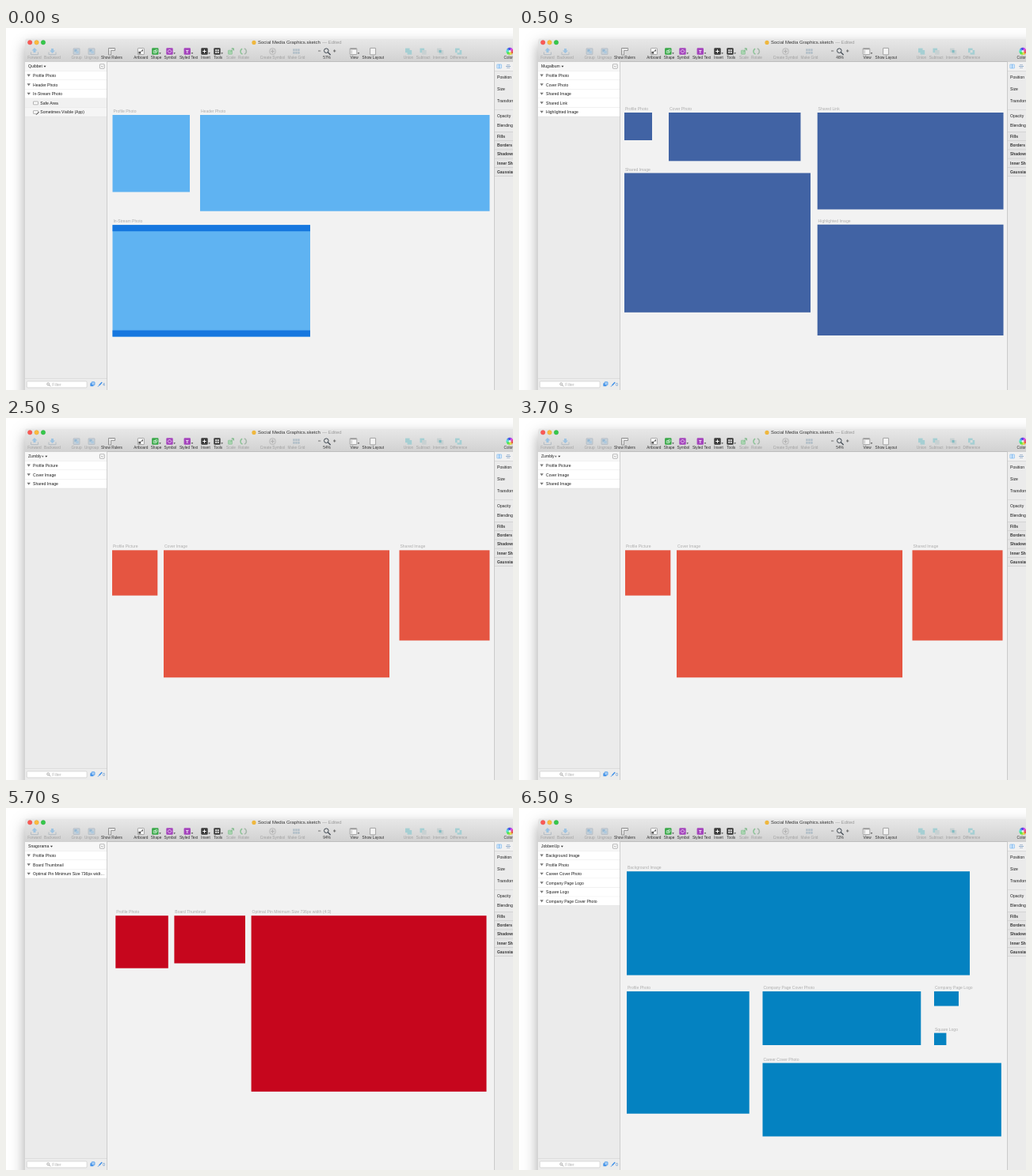
Recreate the animation shown at these times as an HTML page with a canvas. Size 640 by 458 pixels, loop 8 s.

```html
<!DOCTYPE html>
<html lang="en">
<head>
<meta charset="utf-8">
<title>Artboard templates</title>
<style>
  html, body { margin: 0; width: 100%; height: 100%; overflow: hidden; background: #fff; }
  canvas { display: block; width: 640px; height: 458px; }
</style>
</head>
<body>
<canvas id="stage"></canvas>
<script>
const W = 640, H = 458, LOOP = 8000;
const canvas = document.getElementById('stage');
const dpr = window.devicePixelRatio || 1;
canvas.width = W * dpr;
canvas.height = H * dpr;
const ctx = canvas.getContext('2d');

// Boards are [label, x, y, width, height].
const scenes = [
  { end: 500, page: 'Quibbet', zoom: '57%', color: '#5fb3f2', count: '4',
    layers: ['Profile Photo', 'Header Photo', 'In-Stream Photo'],
    children: ['Safe Area', 'Sometimes Visible (App)'],
    boards: [['Profile Photo', 134.5, 110, 97.5, 97.5], ['Header Photo', 245, 110, 365.5, 121.7],
      ['In-Stream Photo', 134.5, 249.2, 249.5, 141.3]],
    bands: [249.2, 382.5] },
  { end: 2500, page: 'Mugalbum', zoom: '46%', color: '#4163a4', count: '0',
    layers: ['Profile Photo', 'Cover Photo', 'Shared Image', 'Shared Link', 'Highlighted Image'],
    boards: [['Profile Photo', 133, 107, 35, 35], ['Cover Photo', 189, 107, 166.5, 61.3],
      ['Shared Link', 376.7, 107, 234.8, 122.5], ['Shared Image', 133, 183.5, 235, 176.3],
      ['Highlighted Image', 376.7, 248.7, 234.8, 140.3]] },
  { end: 4500, page: 'Zumbly+', zoom: '54%', color: '#e55541', count: '0',
    layers: ['Profile Picture', 'Cover Image', 'Shared Image'],
    boards: [['Profile Picture', 134, 167.3, 57.3, 57.3], ['Cover Image', 199, 167.3, 285, 161],
      ['Shared Image', 496.5, 167.3, 114, 114.2]] },
  { end: 6500, page: 'Snagorama', zoom: '94%', color: '#c6061d', count: '0',
    layers: ['Profile Photo', 'Board Thumbnail', 'Optimal Pin Minimum Size 736px widt…'],
    boards: [['Profile Photo', 138.3, 136.2, 66.5, 66.5], ['Board Thumbnail', 212.4, 136.2, 89.6, 60.3],
      ['Optimal Pin Minimum Size 736px width (4:3)', 309.6, 136.2, 296.9, 222.6]] },
  { end: 8000, page: 'JobbenUp', zoom: '72%', color: '#0482c1', count: '0',
    layers: ['Background Image', 'Profile Photo', 'Career Cover Photo', 'Company Page Logo',
      'Square Logo', 'Company Page Cover Photo'],
    boards: [['Background Image', 136, 80.2, 433, 131.3], ['Profile Photo', 136, 232, 154.7, 154.7],
      ['Company Page Cover Photo', 307.5, 232, 199.8, 68], ['Company Page Logo', 524, 232, 31, 18.5],
      ['Square Logo', 524, 284.6, 15.4, 15.4], ['Career Cover Photo', 307.5, 322.6, 301.3, 92.9]] }
];

function rect(x, y, w, h, fill) {
  ctx.fillStyle = fill;
  ctx.fillRect(x, y, w, h);
}

function box(x, y, w, h, r, fill, stroke, lw = 0.6) {
  ctx.beginPath();
  ctx.roundRect(x, y, w, h, r);
  paint(fill, stroke, lw);
}

function disc(x, y, r, fill, stroke, lw = 0.6) {
  ctx.beginPath();
  ctx.arc(x, y, r, 0, Math.PI * 2);
  paint(fill, stroke, lw);
}

function poly(points, fill, stroke, lw = 0.7, closed = true) {
  ctx.beginPath();
  for (let i = 0; i < points.length; i += 2) ctx.lineTo(points[i], points[i + 1]);
  if (closed) ctx.closePath();
  paint(fill, stroke, lw);
}

function paint(fill, stroke, lw) {
  if (fill) { ctx.fillStyle = fill; ctx.fill(); }
  if (stroke) { ctx.strokeStyle = stroke; ctx.lineWidth = lw; ctx.stroke(); }
}

const line = (x1, y1, x2, y2, color, lw) => poly([x1, y1, x2, y2], null, color, lw, false);
const down = (x, y, r, color) => poly([x - r, y - r * 0.6, x + r, y - r * 0.6, x, y + r * 0.8], color);

// Type is set ten times larger and scaled down, so small sizes keep true spacing.
function text(s, x, y, { size = 5.08, color = '#1c1c1c', align = 'left', weight = 400 } = {}) {
  ctx.save();
  ctx.translate(x, y);
  ctx.scale(0.1, 0.1);
  ctx.font = `${weight} ${size * 10}px "Liberation Sans", Arial, sans-serif`;
  ctx.textAlign = align;
  ctx.fillStyle = color;
  ctx.fillText(s, 0, 0);
  const width = ctx.measureText(s).width / 10;
  ctx.restore();
  return width;
}

function lens(x, y, r, color, lw) {
  disc(x, y, r, null, color, lw);
  line(x + r * 0.7, y + r * 0.7, x + r * 1.9, y + r * 1.9, color, lw * 1.3);
}

function drawWindow() {
  rect(0, 0, W, H, '#fff');
  ctx.save();
  ctx.shadowColor = 'rgba(0,0,0,.36)';
  ctx.shadowBlur = 17 * dpr;
  ctx.shadowOffsetY = 8 * dpr;
  box(24, 13, 700, 520, 4, '#f2f2f2');
  ctx.restore();

  const bar = ctx.createLinearGradient(0, 13, 0, 42);
  bar.addColorStop(0, '#e8e8e8');
  bar.addColorStop(1, '#d2d2d2');
  box(24, 13, 700, 29.5, [4, 0, 0, 0], bar);
  rect(26, 13, 614, 0.6, '#f4f4f4');
  rect(24, 42, 616, 0.8, '#b4b4b4');

  disc(30.2, 18.3, 2.7, '#fb5a55', '#df4744', 0.4);
  disc(38.6, 18.3, 2.7, '#fcbb3e', '#dda033', 0.4);
  disc(47, 18.3, 2.7, '#35c84b', '#28a839', 0.4);
  disc(313, 18.4, 2.6, '#efb73e');
  text('Social Media Graphics.sketch', 318, 20.4, { size: 5.98, color: '#333' });
  text('— Edited', 399.2, 20.4, { size: 5.9, color: '#999' });
}

function drawArrow(x, dir) {
  const c = '#9ec4e2';
  const y = dir < 0 ? 25 : 32;
  poly([x, y, x + 3.5, y - dir * 3.5, x + 1.5, y - dir * 3.5, x + 1.5, y - dir * 6,
    x - 1.5, y - dir * 6, x - 1.5, y - dir * 3.5, x - 3.5, y - dir * 3.5], c);
  poly([x - 4.5, 30.5, x - 4.5, 33.7, x + 4.5, 33.7, x + 4.5, 30.5], null, '#b3bcc3', 1, false);
}

function drawPair(x, a, b, mid) {
  rect(x - 4, 25.6, 5.6, 5.6, a);
  rect(x - 1.4, 28, 5.6, 5.6, b);
  if (mid) rect(x - 1.4, 28, 3, 3.2, mid);
}

function drawTile(x, fill) {
  box(x - 4.2, 25.3, 8.4, 8.4, 1.2, fill);
  down(x + 6.2, 32, 1.2, '#444');
}

function drawToolbar() {
  drawArrow(36, -1);
  drawArrow(58.5, 1);
  for (const x of [89, 108]) {
    box(x - 4, 25.8, 8, 7.6, 0.5, '#c5d0d9', '#a9b3bb');
    rect(x - 2.6, 27, 3.2, 3.2, '#98b9d3');
    rect(x - 0.6, 29, 3.2, 3.2, '#adc9de');
  }

  poly([129.5, 25.5, 137.5, 25.5, 137.5, 28.5, 132.5, 28.5, 132.5, 34, 129.5, 34], '#f3f3f3', '#757575');
  for (let i = 0; i < 3; i++) {
    line(131.5 + i * 2, 25.6, 131.5 + i * 2, 27, '#777', 0.4);
    line(129.6, 29 + i * 1.7, 131, 29 + i * 1.7, '#777', 0.4);
  }

  box(166.4, 25.6, 8, 8, 0.7, '#fafafa', '#777');
  rect(167.4, 29.8, 2.8, 2.8, '#555');
  poly([170.5, 29.5, 173, 27, 173, 29.5], '#666');
  line(170, 30, 173, 27, '#666', 0.6);

  drawTile(188.3, '#39a849');
  box(186.2, 28.5, 3.6, 3.2, 0.4, '#6cc779', '#dff4e2', 0.6);
  disc(189.8, 28.8, 1.6, null, '#dff4e2', 0.6);
  drawTile(206.5, '#a545bd');
  poly([206.5, 27, 209, 29.5, 206.5, 32, 204, 29.5], null, '#f6e4fa', 0.8);
  drawTile(228.8, '#a545bd');
  text('T', 228.8, 31.6, { size: 6, color: '#fff', align: 'center', weight: 700 });
  drawTile(250.5, '#3b3b3b');
  line(248.3, 29.5, 252.7, 29.5, '#fff', 1);
  line(250.5, 27.3, 250.5, 31.7, '#fff', 1);
  drawTile(266.5, '#3b3b3b');
  for (let i = 0; i < 4; i++) rect(264.2 + (i % 2) * 2.6, 27.2 + (i >> 1) * 2.6, 2, 2, '#e8e8e8');

  box(280.5, 28.2, 5, 5, 0.5, '#a9d5b1', '#82bd8c');
  poly([283.5, 30.2, 287.5, 26, 284.8, 26, 287.5, 26, 287.5, 28.7], null, '#75b581', 0.8, false);
  ctx.beginPath();
  ctx.arc(299.7, 29.6, 3.7, 1.9, 4.3);
  paint(null, '#8cc497', 1.6);
  ctx.beginPath();
  ctx.arc(299.7, 29.6, 3.7, 5, 7.5);
  paint(null, '#a6b8aa', 1.6);

  disc(336.5, 29.6, 4, '#d5d5d5', '#aaa');
  line(334.2, 29.6, 338.8, 29.6, '#aaa', 0.8);
  line(336.5, 27.3, 336.5, 31.9, '#aaa', 0.8);
  for (let i = 0; i < 6; i++)
    rect(362.3 + (i % 3) * 3, 26.4 + (i / 3 | 0) * 3.6, 2.3, 2.8, '#afbdc7');

  line(394, 29, 397.2, 29, '#444', 0.7);
  line(413, 29, 416.4, 29, '#444', 0.7);
  line(414.7, 27.3, 414.7, 30.7, '#444', 0.7);
  lens(404.3, 28.7, 2.8, '#3e4750', 1);

  box(434.2, 25.6, 8.6, 8, 0.7, '#f7f7f7', '#777');
  rect(434.5, 26, 8, 1.3, '#999');
  rect(435.2, 28.2, 2, 4.4, '#d0d0d0');
  down(445, 32, 1.2, '#444');
  box(459.6, 25.4, 7, 8.4, 0.5, '#f3f3f3', '#777');

  const pale = '#a5cfd3', gray = '#c8d1d2', deep = '#82bcc2';
  drawPair(508, pale, pale);
  drawPair(526.5, pale, gray);
  drawPair(548, gray, gray, deep);
  drawPair(571, pale, pale, '#d9dddd');

  const hues = 12;
  for (let i = 0; i < hues; i++) {
    ctx.beginPath();
    ctx.moveTo(636, 29.4);
    ctx.arc(636, 29.4, 4.6, i / hues * 6.284, (i + 1.1) / hues * 6.284);
    paint(`hsl(${i * 30} 75% 58%)`);
  }
  disc(636, 29.4, 1.4, '#eee');

  const dim = [['Forward', 36], ['Backward', 58.5], ['Group', 89], ['Ungroup', 108], ['Scale', 284],
    ['Rotate', 300], ['Create Symbol', 336.5], ['Make Grid', 366.5], ['Union', 508],
    ['Subtract', 526.7], ['Intersect', 548], ['Difference', 571.3]];
  const live = [['Show Rulers', 133.5], ['Artboard', 170.3], ['Shape', 189.5], ['Symbol', 207.3],
    ['Styled Text', 230.5], ['Insert', 252], ['Tools', 267.7], ['View', 439.5], ['Show Layout', 463.3]];
  const label = (items, color) => {
    for (const [s, x] of items) text(s, x, 39.1, { size: 4.75, color, align: 'center' });
  };
  label(dim, '#a0a0a0');
  label(live, '#2e2e2e');
  text('Colors', 628.5, 39.1, { size: 4.75, color: '#2e2e2e' });
}

function drawInspector() {
  rect(616.4, 42.8, 24, H, '#ebebeb');
  rect(616.4, 42.8, 24, 11.4, '#f1f1f1');
  rect(616.4, 54, 24, 0.6, '#d0d0d0');
  box(619.8, 46, 5.6, 5, 0.4, '#d3e7fa', '#62a8ea', 0.5);
  line(622.6, 46, 622.6, 51, '#4c9be8', 0.6);
  line(631, 48.5, 637, 48.5, '#7b9fc5', 0.8);
  rect(632, 46, 4, 1.2, '#b4c4d6');
  rect(632, 49.8, 4, 1.2, '#b4c4d6');

  const plain = { Position: 62.2, Size: 77.3, Transform: 92.4, Opacity: 111.5, Blending: 123 };
  for (const s in plain) text(s, 620, plain[s] + 1.9);
  rect(616.4, 103, 24, 0.6, '#d2d2d2');
  ['Fills', 'Borders', 'Shadows', 'Inner Shadow', 'Gaussian Blur'].forEach((s, i) => {
    const y = 131.2 + i * 11.2;
    rect(616.4, y, 24, 11.2, '#e5e5e5');
    rect(616.4, y, 24, 0.6, '#c9c9c9');
    text(s, 620, y + 7.7, { size: 4.95, weight: 700, color: '#333' });
  });
  rect(616.4, 187.2, 24, 0.6, '#c9c9c9');
  rect(616, 42.8, 0.8, H, '#c2c2c2');
}

function drawSidebar(scene) {
  const top = 54.4, step = 11.55;
  rect(24, 42.8, 103.5, H, '#ebebeb');
  rect(24, 42.8, 103.5, 11.6, '#f7f7f7');
  rect(24, top - 0.3, 103.5, 0.6, '#d4d4d4');
  const width = text(scene.page, 28, 50.4);
  down(28 + width + 3.2, 48.6, 1.5, '#333');
  box(118.4, 45.8, 5.8, 5.4, 0.5, '#fff', '#858585');
  poly([119.9, 47.8, 121.3, 49.2, 122.7, 47.8], null, '#666', 0.6, false);

  scene.layers.forEach((s, i) => {
    const y = top + i * step;
    rect(24, y, 103.5, step, '#fff');
    rect(24, y + step - 0.3, 103.5, 0.6, '#dedede');
    down(28.7, y + 5.5, 2.2, '#777');
    text(s, 34, y + 7.7);
  });

  (scene.children || []).forEach((s, i) => {
    const y = top + (scene.layers.length + i) * step;
    rect(24, y, 103.5, step, i ? '#f5f5f5' : '#f1f1f1');
    rect(24, y + step - 0.3, 103.5, 0.6, '#e0e0e0');
    box(34.5, y + 4, 6, 3.8, 0.4, '#fafafa', '#888');
    if (i) line(38, y + 9.2, 41.6, y + 5.6, '#444', 1);
    text(s, 43.3, y + 7.7);
  });

  rect(24, 443.4, 103.5, 15, '#ececec');
  rect(24, 443.1, 103.5, 0.6, '#d4d4d4');
  box(26.3, 447, 75.8, 8, 1.2, '#fff', '#c3c3c3');
  lens(53.2, 450.5, 1.5, '#777', 0.6);
  text('Filter', 58.3, 452.8, { color: '#b0b0b0' });
  box(106.4, 449.3, 4, 4, 0.6, '#3c8ee8');
  box(108, 447.8, 4, 4, 0.6, '#a8cef5', '#3c8ee8', 0.7);
  line(116, 453.8, 118, 451.6, '#3c8ee8', 0.8);
  line(117.7, 452, 121.2, 448.3, '#3c8ee8', 1.5);
  text(scene.count, 122.3, 452.6, { size: 4.6, color: '#3478c4' });
  rect(127.2, 42.8, 0.8, H, '#c5c5c5');
}

function drawBoards(scene) {
  for (const [label, x, y, w, h] of scene.boards) {
    text(label, x + 0.9, y - 3, { color: '#adadad' });
    rect(x, y, w, h, scene.color);
  }
  for (const y of scene.bands || []) rect(134.5, y, 249.5, 8, '#1677df');
}

function draw(scene) {
  ctx.setTransform(dpr, 0, 0, dpr, 0, 0);
  drawWindow();
  drawToolbar();
  text(scene.zoom, 405, 39.1, { size: 4.75, color: '#2e2e2e', align: 'center' });
  drawBoards(scene);
  drawInspector();
  drawSidebar(scene);
}

let shown = null;
const start = performance.now();

function tick() {
  const t = (performance.now() - start) % LOOP;
  const scene = scenes.find(s => t < s.end);
  if (scene !== shown) draw(shown = scene);
  requestAnimationFrame(tick);
}
tick();
</script>
</body>
</html>
```
